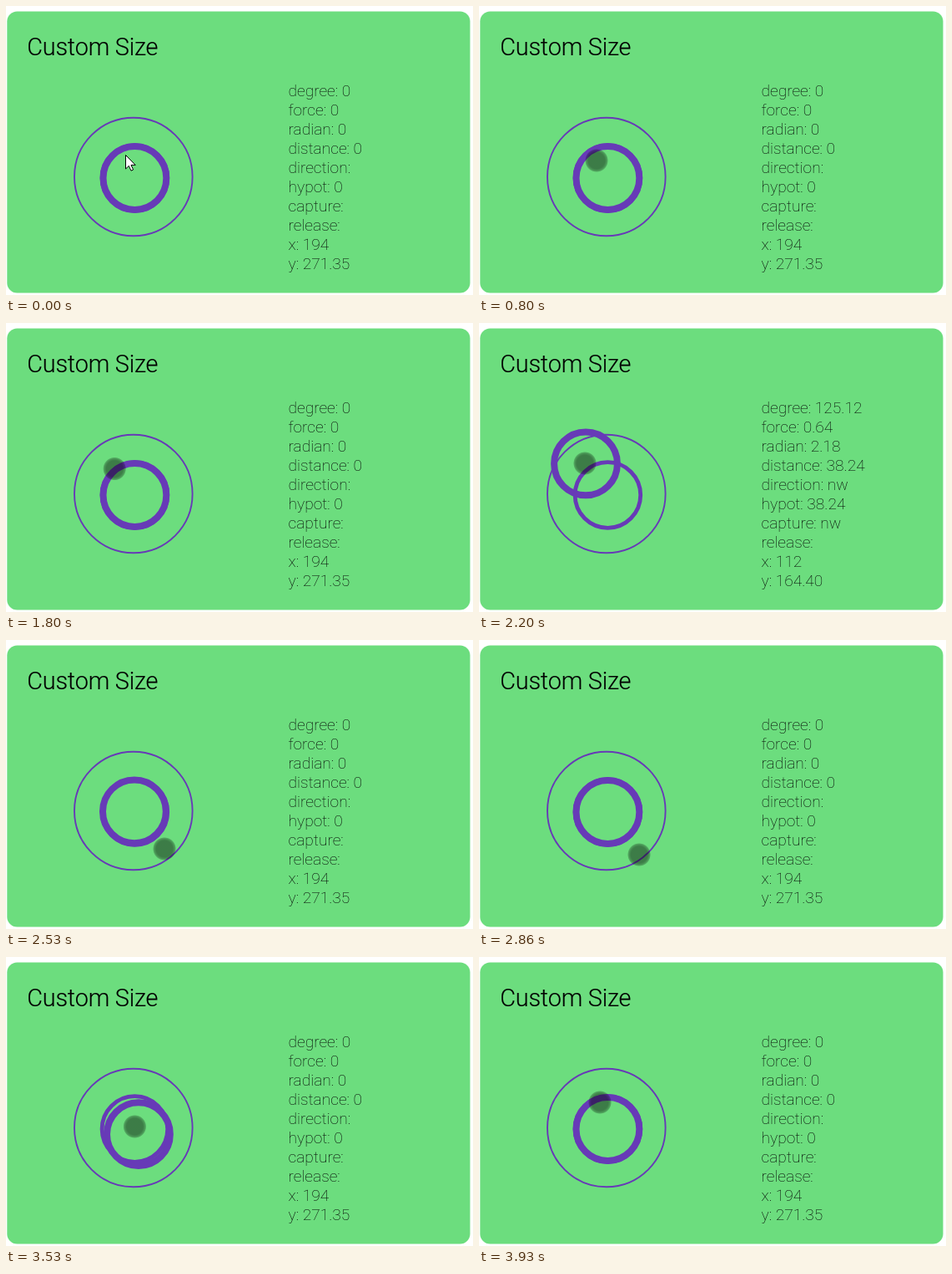
An HTML page that plays this animation: 560x346 px, repeating every 4260 ms.

```html
<!DOCTYPE html>
<html lang="en">
<head>
<meta charset="utf-8">
<title>Custom Size</title>
<style>
  html, body { margin: 0; width: 100%; height: 100%; overflow: hidden; background: #fff; }
  svg { display: block; width: 560px; height: 346px; }
  text { font-family: Roboto, sans-serif; white-space: pre; }
  .title { font-size: 28.8px; font-weight: 300; letter-spacing: -.18px; stroke: #000; stroke-width: .15; }
  .data { font-size: 19.2px; font-weight: 100; }
  .ring { fill: none; stroke: #673ab7; }
</style>
</head>
<body>
<svg viewBox="0 0 560 346">
  <defs>
    <radialGradient id="touch">
      <stop offset=".7" stop-opacity=".44"/>
      <stop offset=".82" stop-opacity=".36"/>
      <stop offset=".93" stop-opacity=".24"/>
      <stop offset="1" stop-opacity="0"/>
    </radialGradient>
  </defs>
  <rect x="1.3" y="6.4" width="555.2" height="337" rx="12" fill="#6cdd7e"/>
  <text class="title" x="25.3" y="58.7">Custom Size</text>
  <g id="data" class="data"></g>
  <circle class="ring" cx="152.8" cy="204.5" r="70.8" stroke-width="1.9"/>
  <circle class="ring" cx="154.4" cy="206" r="39.3" stroke-width="4.8"/>
  <circle id="stick" class="ring" r="37.9" stroke-width="8"/>
  <path id="arrow" d="M143.5 178.5v16.5l3.8-3.6 2.7 5.8 2.6-1.2-2.6-5.6h5.2z" fill="#fff" stroke="#000"/>
  <circle id="dot" r="14" fill="url(#touch)"/>
</svg>
<script>
const LOOP = 4260, STEP = 200 / 3, HOLD = 222, RETURN = 300;
const HOME = { x: 134, y: 195.675 }, REACH = 60, SCALE = 1.2;
const drags = [
  { start: 2065, x: 112, y: 164.4, dir: 'nw' },
  { start: 3132, x: 166.4, y: 239.6, dir: 'sw' }
];
// Pointer path: time, x, y
const path = [
  [800, 141, 185], [1133, 143, 201], [1533, 143, 201], [1866, 127, 168],
  [2266, 127, 168], [2533, 190, 250], [2666, 195, 259], [2733, 195, 259],
  [2866, 192, 257], [3266, 192, 257], [3533, 154.4, 203], [3600, 154.4, 203],
  [3933, 145, 174]
];
const names = ['degree', 'force', 'radian', 'distance', 'direction', 'hypot', 'capture', 'release', 'x', 'y'];
const rest = [0, 0, 0, 0, '', 0, '', '', 194, 271.35];

const $ = id => document.getElementById(id);
const place = (el, x, y) => {
  el.setAttribute('cx', x);
  el.setAttribute('cy', y);
};

const lines = names.map((name, i) => {
  const line = document.createElementNS('http://www.w3.org/2000/svg', 'text');
  line.setAttribute('x', 338.5);
  line.setAttribute('y', 108 + i * 23);
  return $('data').appendChild(line);
});

// cubic-bezier(.25, .1, .25, 1), solved by bisection
function ease(p) {
  const curve = (a, b, s) => 3 * a * s * (1 - s) ** 2 + 3 * b * s * s * (1 - s) + s ** 3;
  let low = 0, high = 1;
  for (let i = 0; i < 20; i++) {
    const mid = (low + high) / 2;
    if (curve(.25, .25, mid) < p) low = mid; else high = mid;
  }
  return curve(.1, 1, low);
}

function pointer(t) {
  const i = path.findIndex(key => key[0] > t);
  if (i < 0) return path.at(-1).slice(1);
  const [t0, x0, y0] = path[i - 1], [t1, x1, y1] = path[i];
  const p = (t - t0) / (t1 - t0);
  return [x0 + (x1 - x0) * p, y0 + (y1 - y0) * p];
}

function readings({ x, y, dir }) {
  const dx = x - HOME.x, dy = HOME.y - y;
  const dist = Math.hypot(dx, dy);
  const rad = (Math.atan2(dy, dx) + 2 * Math.PI) % (2 * Math.PI);
  const fix = n => n.toFixed(2);
  return [fix(rad * 180 / Math.PI), fix(dist / REACH), fix(rad), fix(dist), dir,
    fix(dist), dir, '', Number.isInteger(x) ? x : fix(x), fix(y)];
}

function draw(now) {
  // Steps of 1/15 s
  const t = Math.floor((now % LOOP + 7) / STEP) * STEP;
  const drag = drags.find(d => t >= d.start && t < d.start + HOLD + RETURN);
  let pull = 0, values = rest;
  if (drag) {
    const back = t - drag.start - HOLD;
    pull = back < 0 ? 1 : 1 - ease(back / RETURN);
    if (back < 0) values = readings(drag);
  }
  const { x, y } = drag || HOME;
  place($('stick'), 154.4 + (x - HOME.x) * SCALE * pull, 206 + (y - HOME.y) * SCALE * pull);
  lines.forEach((line, i) => line.textContent = `${names[i]}: ${values[i]}`);

  const touching = t >= 799;
  $('arrow').style.display = touching ? 'none' : '';
  $('dot').style.display = touching ? '' : 'none';
  if (touching) place($('dot'), ...pointer(Math.max(t, 800)));
}

const begin = performance.now();
function tick() {
  draw(performance.now() - begin);
  requestAnimationFrame(tick);
}
tick();
</script>
</body>
</html>
```
